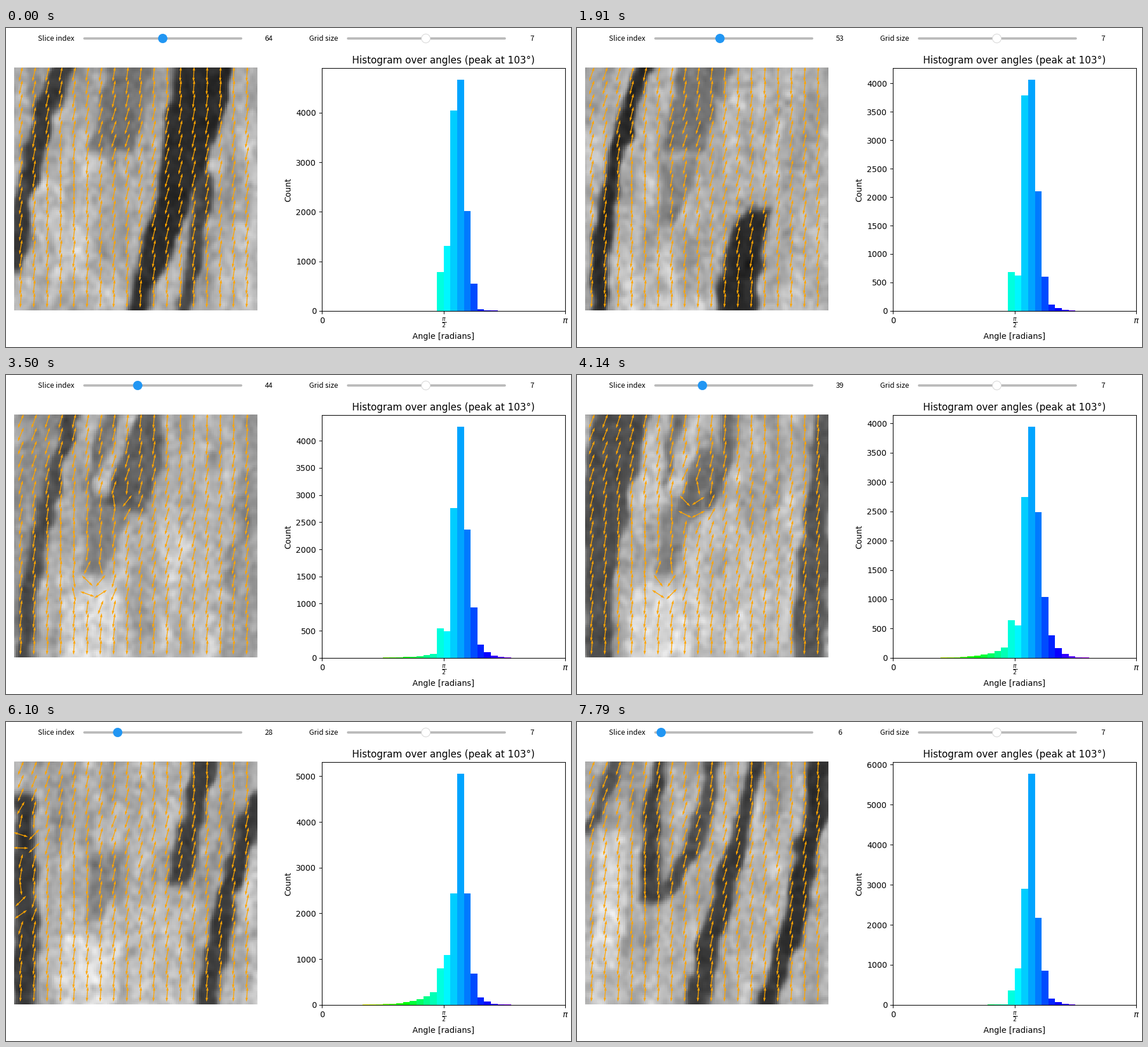
These frames come from a looping animation (973x549 px, 8000 ms). A matplotlib script:

```python
from functools import lru_cache

import numpy as np
import matplotlib.pyplot as plt
from matplotlib.animation import FuncAnimation
from matplotlib.patches import Circle

W, H, DPI = 973, 549, 100
STEP, LOOP = 40, 8000
N, GRID, BINS = 128, 7, 36
LEFT, TOP, SIDE = 14, 68, 418.6

# ---- the drag of the slice slider: time -> slice
DRAG_T = [0, 160, 1910, 2930, 4140, 5140, 6100, 6350, 6750, 7050, 7790]
DRAG_V = [64, 63, 53, 47, 39, 33, 28, 27, 24, 22, 6]


def slice_at(t):
    jump = 2 if t > 6750 else 1
    return jump * int(np.ceil(np.interp(t, DRAG_T, DRAG_V) / jump - 1e-6))


# ---- pixel and arrow positions on the stage
axis = (np.arange(N) + 0.5) * SIDE / N
X, Y = np.meshgrid(LEFT + axis, TOP + axis)
pick = np.arange(GRID // 2, N, GRID)
AX, AY = X[np.ix_(pick, pick)], Y[np.ix_(pick, pick)]


# ---- picture: soft dark and light bands over streaky grain
bands = []


def band(first, last, xs, half, tone=55, span=(50, 500), taper=1):
    """A band through three x positions, present between two slices."""
    bands.append((first, last, np.polyfit([0, 0.5, 1], xs, 2), half, tone, span, taper))


# light areas
band(22, 48, (150, 145, 142), 50, 214, (370, 500))
band(-9, 18, (62, 56, 50), 26, 212, (190, 430))
# whorl
band(50, 80, (215, 204, 182), 40, 112, (50, 215))
band(42, 50, (228, 208, 185), 42, 90, (50, 235))
band(20, 58, (176, 166, 150), 36, 128, (225, 345), 0.5)
band(30, 42, (230, 212, 188), 24, 104, (125, 235), 0.7)
band(30, 50, (250, 256, 220), 13, 98, (50, 235))
band(30, 50, (188, 160, 168), 9, 108, (50, 222))
band(30, 50, (214, 187, 163), 15, 190, (60, 212), 0.7)
# trunk and its leg
band(58, 80, (345, 294, 219), 56, 36, taper=0.3)
band(58, 80, (345, 330, 302), 15, 60, (250, 500))
band(49, 58, (312, 286, 270), 24, 34, (312, 500), 1.6)
# middle bands and the hook
band(19, 31, (344, 321, 300), 25, 58, (50, 282), 0.7)
band(-9, 19, (321, 258, 203), 12, 52, taper=2)
band(-9, 17, (146, 130, 130), 10, 58, (50, 312), 1.7)
band(-9, 17, (232, 214, 142), 11, 72, (50, 302), 1.5)
# left band
band(58, 80, (110, 45, 12), 17, 50, (50, 420))
band(43, 58, (124, 58, 34), 15, 34)
band(31, 43, (80, 42, 38), 48, 72, taper=0.4)
band(20, 31, (28, 34, 26), 21, 52, (125, 500))
band(-9, 20, (74, 45, 18), 21, 82, (50, 195), 0.5)
# right band
band(31, 43, (430, 411, 396), 14, 82, taper=2.3)
band(18, 31, (437, 382, 344), 16, 50, (120, 500), 1.2)
band(-9, 18, (426, 388, 327), 19, 44)


@lru_cache(None)
def grain(seed, sx, sy):
    """Gaussian-smoothed noise with unit deviation."""
    f = np.fft.fftfreq(N)
    low = np.exp(-2 * np.pi ** 2 * ((sx * f[None, :]) ** 2 + (sy * f[:, None]) ** 2))
    noise = np.random.default_rng(seed).normal(size=(N, N))
    out = np.fft.ifft2(np.fft.fft2(noise) * low).real
    return out / out.std()


def drift(v, sx, sy, seed, span=4):
    """Noise that changes smoothly from slice to slice."""
    k, f = divmod(v, span)
    f /= span
    mix = grain(seed + k, sx, sy) * (1 - f) + grain(seed + k + 1, sx, sy) * f
    return mix / np.hypot(f, 1 - f)


def ramp(d, soft=2.8):
    return 1 / (1 + np.exp(np.clip(-d / soft, -40, 40)))


@lru_cache(None)
def picture(v):
    img = 170 + 10 * np.exp(-((v - 36) / 5) ** 2) + 16 * (Y - TOP) / SIDE
    img += 10 * drift(v, 3, 10, 100)
    x = X + 3.5 * drift(v, 3, 4, 300)
    for first, last, curve, half, tone, (y0, y1), taper in bands:
        life = np.clip((v - first) / 4 + 0.5, 0, 1) * np.clip((last - v) / 4 + 0.5, 0, 1)
        if life == 0:
            continue
        t = np.clip((Y - y0) / (y1 - y0), 0, 1)
        edge = half * (1 + (taper - 1) * t) - np.abs(x - np.polyval(curve, t))
        mask = 0.95 * life * ramp(edge) * ramp(Y - y0, 4) * ramp(y1 - Y, 4)
        img = img * (1 - mask) + tone * mask
    img += (3 + img / 30) * drift(v, 1.3, 1.5, 500, 2)
    return np.clip(img, 0, 245)


# ---- arrows: a gentle lean to the right, circling around a few eddies
EDDIES = [(150, 340, 43, 5), (200, 198, 38, 5), (32, 172, 28, 3), (12, 290, 28, 3)]


@lru_cache(None)
def directions(v):
    u, h = (AX - LEFT) / SIDE, (AY - TOP) / SIDE

    def hill(u0, h0, su, sh):
        return np.exp(-((u - u0) / su) ** 2 - ((h - h0) / sh) ** 2)

    lean = (2 + 11 * (1 - h ** 5)
            - 11 * hill(0.22, 0.5, 0.12, 0.2) - 11 * hill(0.8, 0, 0.4, 0.16)
            + 7 * hill(0.42, 0.25, 0.1, 0.12) + 4 * hill(0.6, 0.5, 0.12, 0.25)
            + 10 * np.clip((60 - v) / 10, 0, 1) * hill(0, 0.08, 0.2, 0.2))
    z = np.exp(2j * np.radians(lean))
    for x, y, center, width in EDDIES:
        dx, dy = AX - x, AY - y
        near = np.exp(-(dx ** 2 + (dy - 20) ** 2) / 800 - ((v - center) / width) ** 2)
        z += 4 * near * np.exp(2j * np.arctan2(dy, dx))
    angle = np.angle(z).ravel() / 2
    return np.sin(angle), np.cos(angle)


# ---- histogram: the eight bins around the peak, with geometric tails
PEAK_BIN = 16
PEAKS = {
    64: (0, 786, 1314, 4047, 4670, 2017, 551, 35),
    53: (0, 684, 623, 3790, 4066, 2104, 603, 112),
    47: (8, 481, 459, 2763, 4452, 2293, 872, 168),
    39: (178, 644, 555, 2745, 3945, 2488, 1041, 387),
    33: (232, 864, 495, 2634, 4195, 2202, 1149, 421),
    28: (280, 800, 1093, 2440, 5057, 2440, 686, 165),
    6: (15, 363, 914, 2903, 5777, 2177, 856, 160),
}
keys = sorted(PEAKS)


def counts_at(v):
    core = [np.interp(v, keys, col) for col in zip(*(PEAKS[k] for k in keys))]
    left = core[0] * 0.68 ** np.arange(PEAK_BIN, 0, -1)
    right = core[-1] * 0.42 ** np.arange(1, BINS - PEAK_BIN - len(core) + 1)
    return np.r_[left, core, right]


# ---- figure
fig = plt.figure(figsize=(W / DPI, H / DPI), dpi=DPI, facecolor="white")


def place(x, y, w, h):
    return fig.add_axes([x / W, 1 - (y + h) / H, w / W, h / H])


view = place(LEFT, TOP, 419, 418.5)
image = view.imshow(picture(64), cmap="gray", vmin=0, vmax=255,
                    interpolation="nearest", aspect="auto")
gx, gy = np.meshgrid(pick, pick)
px, py = np.tile(gx.ravel(), 2), np.tile(gy.ravel(), 2)
arrows = view.quiver(px, py, np.zeros(px.size), np.ones(px.size), color="orange",
                     scale=32.4, scale_units="width", width=0.06 / 18)
view.set(xlim=(-0.5, N - 0.5), ylim=(N - 0.5, -0.5))
view.axis("off")

hist = place(544.1, 68.9, 419, 418)
centers = (np.arange(BINS) + 0.5) * np.pi / BINS
bars = hist.bar(centers, np.ones(BINS), width=np.pi / BINS,
                color=plt.cm.hsv(centers / np.pi))
hist.set(xlim=(0, np.pi), xlabel="Angle [radians]", ylabel="Count",
         title="Histogram over angles (peak at 103°)")
hist.set_xticks([0, np.pi / 2, np.pi], ["0", r"$\frac{\pi}{2}$", r"$\pi$"])

panel = place(0, 0, W, H)
panel.set(xlim=(0, W), ylim=(H, 0))
panel.axis("off")


def label(x, text, ha="left"):
    return panel.text(x, 22, text, ha=ha, va="baseline", fontsize=9.07,
                      family="Noto Sans CJK JP")


def slider(x, name, left, value, value_x, knob_x, **style):
    label(x, name)
    panel.plot([left + 2, left + 272], [18, 18], color="#bbbbbb", lw=2.88,
               solid_capstyle="round")
    knob = panel.add_patch(Circle((knob_x, 18), 7.6, zorder=3, **style))
    return knob, label(value_x, value, "center")


knob, number = slider(55, "Slice index", 133, "64", 452.5, 270,
                      fc="#2196f3", ec="#2196f3", lw=0.6)
slider(522, "Grid size", 587, "7", 906, 723, fc="white", ec="#d8d8d8", lw=0.8)


def update(i):
    v = slice_at(i * STEP + STEP - 10)
    knob.center = (132 + 2.155 * v, 18)
    number.set_text(str(v))
    image.set_data(picture(v))
    dx, dy = directions(v)
    arrows.set_UVC(np.r_[dx, -dx], np.r_[dy, -dy])
    counts = counts_at(v)
    for bar, c in zip(bars, counts):
        bar.set_height(c)
    hist.set_ylim(0, counts.max() * 1.05)
    return image, arrows, knob, number, *bars


anim = FuncAnimation(fig, update, frames=LOOP // STEP, interval=STEP,
                     repeat=True, repeat_delay=0, blit=False)
plt.show()
```
